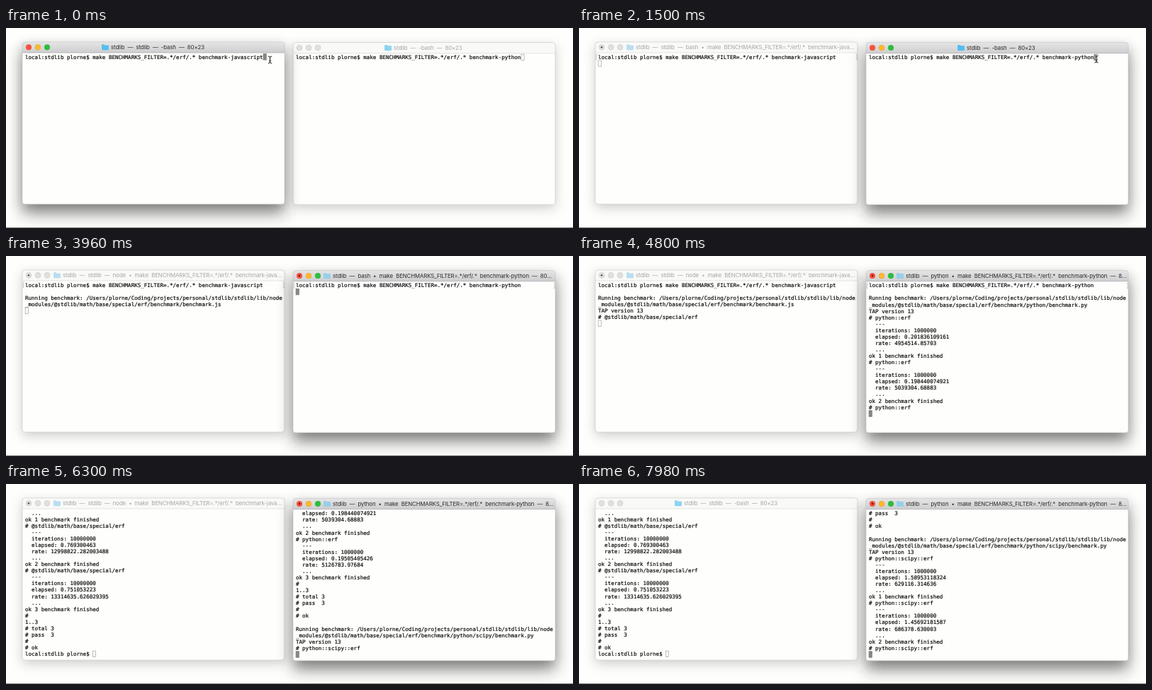
An HTML page for the animation above (8 s loop, 800x283 px).

```html
<!DOCTYPE html>
<html lang="en">
<head>
<meta charset="utf-8">
<title>Two terminals</title>
<style>
  html, body { margin: 0; width: 100%; height: 100%; overflow: hidden; background: #fefefc; }
  svg { display: block; width: 100vw; height: 100vh; }
  text { white-space: pre; }
  .mono { font: 7.54px "DejaVu Sans Mono", monospace; fill: #080808; stroke: #080808; stroke-width: .18px; }
  .title { font: 7.8px Inter, sans-serif; letter-spacing: -.08px; word-spacing: 2px; }
</style>
</head>
<body>
<svg id="stage" viewBox="0 0 800 283">
  <defs>
    <linearGradient id="bar" x2="0" y2="1">
      <stop offset="0" stop-color="#e6e5e6"/>
      <stop offset="1" stop-color="#cecdcf"/>
    </linearGradient>
    <filter id="soft" x="-30%" y="-30%" width="160%" height="160%"><feGaussianBlur stdDeviation="8"/></filter>
    <filter id="deep" x="-30%" y="-30%" width="160%" height="160%"><feGaussianBlur stdDeviation="11"/></filter>
    <path id="beam" d="M-2.5-5Q0-5 0-3Q0-5 2.5-5M0-3V3M-2.5 5Q0 5 0 3Q0 5 2.5 5M-1.2 1.5H1.2"/>
  </defs>
  <rect width="800" height="283" fill="#fefefc"/>
  <g id="windows"></g>
  <g id="pointer" fill="none">
    <use href="#beam" stroke="#fff" stroke-width="2.2"/>
    <use href="#beam" stroke="#111"/>
  </g>
  <rect y="282" width="800" height="1" fill="#8a8a86"/>
</svg>
<script>
const LOOP = 8000, STEP = 60, ROWS = 23, COL = 4.54, ROW = 9.07;
const ACTIVATE = 1380, HIDE_POINTER = 2100;
const stage = document.getElementById("windows");
const pointer = document.getElementById("pointer");

function el(name, attrs, parent) {
  const node = document.createElementNS("http://www.w3.org/2000/svg", name);
  set(node, attrs);
  parent.appendChild(node);
  return node;
}
function set(node, attrs) {
  for (const key in attrs) node.setAttribute(key, attrs[key]);
}
// Latest entry of a [time, value] list
function at(list, t) {
  return list.filter(item => item[0] <= t).pop()[1];
}

const PROMPT = "local:stdlib plorne$ ";
const MAKE = "make BENCHMARKS_FILTER=.*/erf/.* benchmark-";
const SUMMARY = "#\n1..3\n# total 3\n# pass  3\n#\n# ok\n";
const running = file =>
  "\nRunning benchmark: /Users/plorne/Coding/projects/personal/stdlib/stdlib/lib/node\n" +
  "_modules/@stdlib/math/base/special/erf/benchmark/" + file + "\n";
const result = (n, iterations, elapsed, rate, next) =>
  `  ---\n  iterations: ${iterations}\n  elapsed: ${elapsed}\n  rate: ${rate}\n  ...\n` +
  `ok ${n} benchmark finished\n` + next;

const JS = "# @stdlib/math/base/special/erf\n";
const PY = "# python::erf\n";
const SCIPY = "# python::scipy::erf\n";

const terminals = [
  {
    x: 23, y: 19.8, enter: 540, marksEnd: 4480,
    shortX: 148, longX: 80,
    output: [
      [0, PROMPT + MAKE + "javascript"],
      [540, "\n"],
      [3720, running("benchmark.js")],
      [4500, "TAP version 13\n" + JS],
      [5160, result(1, 1e7, "0.781527042", "12795462.461200384", JS)],
      [5700, result(2, 1e7, "0.769300463", "12998822.282003488", JS)],
      [6240, result(3, 1e7, "0.751053223", "13314635.626029395", SUMMARY + PROMPT)]
    ],
    titles: [
      [0, "stdlib — stdlib — -bash — 80×23"],
      [660, "stdlib — stdlib — uname • " + MAKE + "jav…"],
      [1500, "stdlib — stdlib — bash • " + MAKE + "java…"],
      [3480, "stdlib — stdlib — node • " + MAKE + "java…"],
      [6360, "stdlib — stdlib — -bash — 80×23"]
    ]
  },
  {
    x: 405, y: 20.5, enter: 2100, marksEnd: LOOP,
    shortX: 547, longX: 461,
    output: [
      [0, PROMPT + MAKE + "python"],
      [2100, "\n"],
      [4200, running("python/benchmark.py")],
      [4320, "TAP version 13\n" + PY],
      [4500, result(1, 1e6, "0.201836109161", "4954514.85703", PY)],
      [4680, result(2, 1e6, "0.198440074921", "5039304.68883", PY)],
      [4860, result(3, 1e6, "0.19505405426", "5126783.97684", SUMMARY)],
      [4920, running("python/scipy/benchmark.py")],
      [5040, "TAP version 13\n" + SCIPY],
      [6360, result(1, 1e6, "1.58953118324", "629116.314636", SCIPY)],
      [7500, result(2, 1e6, "1.45692181587", "686378.630003", SCIPY)]
    ],
    titles: [
      [0, "stdlib — -bash — 80×23"],
      [2220, "stdlib — bash • " + MAKE + "python — 80…"],
      [4260, "stdlib — python • " + MAKE + "python — 8…"]
    ]
  }
];

function build(term) {
  const g = term.g = el("g", { transform: `translate(${term.x} ${term.y})` }, stage);
  const frame = { width: 370, height: 229.4 };
  term.glow = el("rect", { ...frame, y: 5, filter: "url(#soft)", fill: "#777" }, g);
  term.shadow = el("rect", { ...frame, y: 13, filter: "url(#deep)", fill: "#222", opacity: .52 }, g);
  el("rect", { ...frame, rx: 3.5, fill: "#fefefc" }, g);
  term.bar = el("path", { d: "M0 15.2V4Q0 0 4 0H366Q370 0 370 4V15.2Z" }, g);
  term.line = el("path", { d: "M0 15.2H370", "stroke-width": .7 }, g);
  el("rect", { ...frame, rx: 3.5, fill: "none", stroke: "#c4c4c4", "stroke-width": .6 }, g);
  term.lights = [9, 22, 35].map(cx => el("circle", { cx, cy: 7.4, r: 4, "stroke-width": .5 }, g));
  term.dot = el("circle", { cx: 9, cy: 7.4, r: 1.3 }, g);
  term.icon = el("path", { d: "M0 1Q0 0 1 0H3.5L4.5 1.2H9Q10 1.2 10 2.2V7Q10 8 9 8H1Q0 8 0 7Z" }, g);
  term.title = el("text", { class: "title", y: 10.5 }, g);
  term.marks = el("path", {
    d: "M2.6 17.5H1.3V25H2.6M367.8 17.5H369.1V25H367.8",
    fill: "none", stroke: "#aaa", "stroke-width": .7
  }, g);
  term.cursor = el("rect", { width: 4.2, height: 8.5, "stroke-width": .7 }, g);
  term.rows = Array.from({ length: ROWS }, (_, i) =>
    el("text", { class: "mono", x: 4, y: 23.8 + i * ROW }, g));
}

function draw(term, t, active) {
  const lines = term.output.filter(o => o[0] <= t).map(o => o[1]).join("").split("\n");
  const first = Math.max(0, lines.length - ROWS);
  const view = lines.slice(first);
  term.rows.forEach((row, i) => { row.textContent = view[i] || ""; });

  const last = view.length - 1;
  set(term.cursor, {
    x: 4.1 + view[last].length * COL,
    y: 16.8 + last * ROW,
    fill: active ? "#888884" : "none",
    stroke: active ? "#74746e" : "#a2a2a0"
  });
  term.marks.style.display = t >= term.enter && t < term.marksEnd && !first ? "" : "none";

  const title = at(term.titles, t);
  const busy = title.includes("•");
  const titleX = (busy ? term.longX : term.shortX) - term.x;
  term.title.textContent = title;
  set(term.title, { x: titleX, fill: active ? "#2a2a2a" : "#a6a6a6" });
  set(term.icon, {
    transform: `translate(${titleX - 13} 3.4)`,
    fill: busy ? "#96cfea" : "#55bfee",
    opacity: active ? 1 : .65
  });

  set(term.bar, { fill: active ? "url(#bar)" : "#f9f9f8" });
  set(term.line, { stroke: active ? "#a8a7ac" : "#d8d8d8" });
  set(term.glow, { opacity: active ? .22 : .36 });
  term.shadow.style.display = active ? "" : "none";
  const colors = ["#fc5040", "#fdb82c", "#28c040"];
  term.lights.forEach((light, i) => set(light, {
    fill: active ? colors[i] : "#e0e0dd",
    stroke: active ? "#8a6a30" : "#c6c6c4",
    "stroke-opacity": active ? .3 : 1
  }));
  set(term.dot, { fill: active ? "#6b1508" : "#55554f" });
  term.dot.style.display = busy ? "" : "none";
}

function drawPointer(t) {
  const p = Math.min(1, Math.max(0, (t - 600) / 420));
  const ease = p * p * (3 - 2 * p);
  set(pointer, { transform: `translate(${372.5 + 357.5 * ease} ${45 - ease})` });
  pointer.style.display = t < HIDE_POINTER ? "" : "none";
}

let front = null;
function render(now) {
  const t = Math.floor(now % LOOP / STEP) * STEP;
  const active = terminals[t < ACTIVATE ? 0 : 1];
  if (front !== active) {
    front = active;
    stage.appendChild(active.g);
  }
  terminals.forEach(term => draw(term, t, term === active));
  drawPointer(t);
}

terminals.forEach(build);
const start = performance.now();
function tick() {
  render(performance.now() - start);
  requestAnimationFrame(tick);
}
tick();
</script>
</body>
</html>
```
